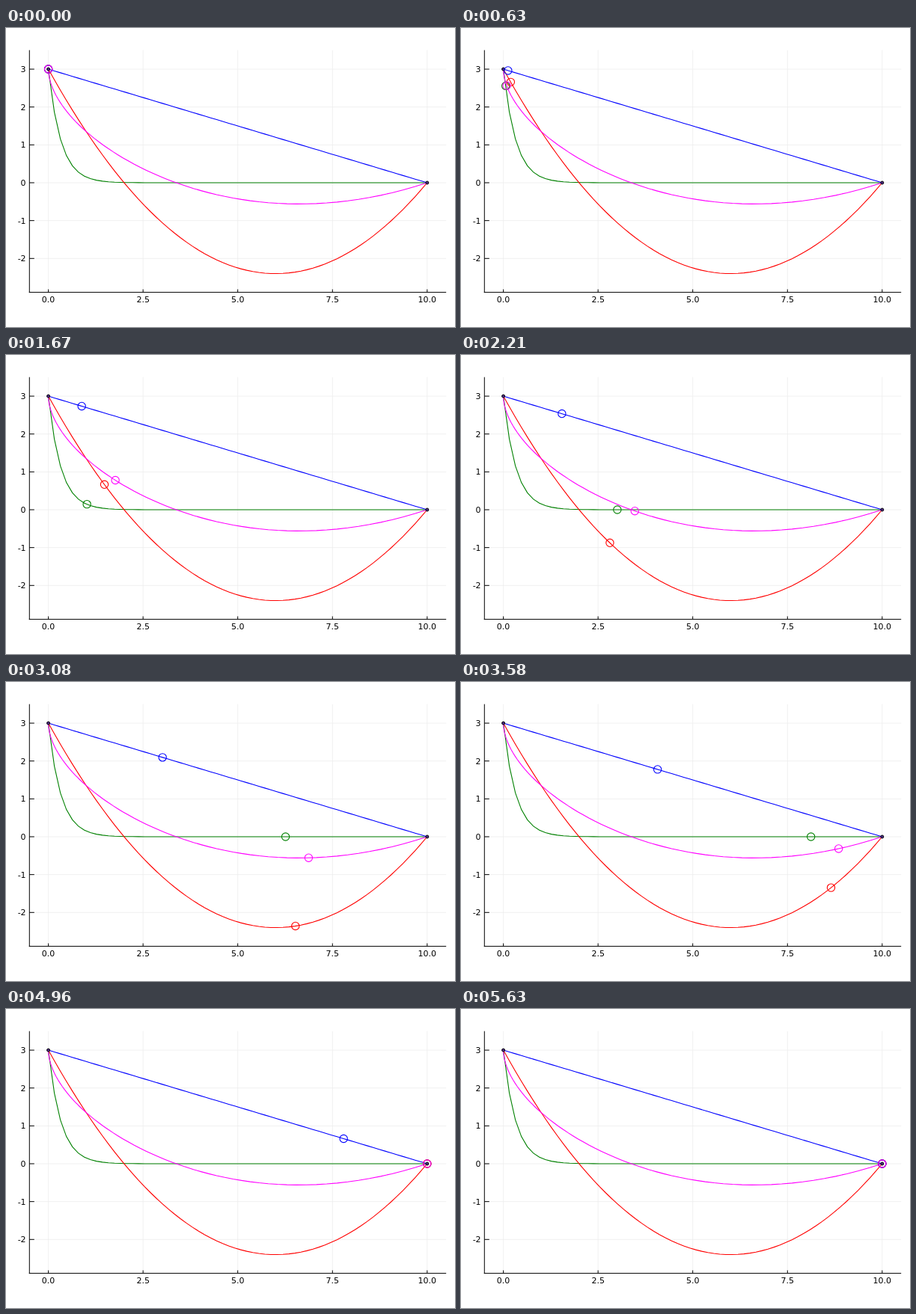
These frames come from a looping animation (600 px wide and 400 px high, 5680 ms). An HTML page:

```html
<!DOCTYPE html>
<html lang="en">
<head>
<meta charset="utf-8">
<title>Descent curves</title>
<style>
  html, body { margin: 0; width: 100%; height: 100%; overflow: hidden; background: #fff; }
  svg { display: block; }
  text { font: 11px "DejaVu Sans", sans-serif; fill: #000; }
</style>
</head>
<body>
<svg id="stage" width="600" height="400" viewBox="0 0 600 400"></svg>
<script>
const LOOP = 5680, FPS = 24, LAST_STEP = 135, DT = 0.02, G = 10;
const X_END = 10, Y_START = 3, SEGMENTS = 63;
const LEFT = 31.3, RIGHT = 588.2, TOP = 29.6, BOTTOM = 353.6;

const px = x => 56.6 + 50.62 * x;
const py = y => 207 - 50.65 * y;
const stage = document.getElementById('stage');

function add(tag, attrs, text) {
  const node = document.createElementNS('http://www.w3.org/2000/svg', tag);
  for (const key in attrs) node.setAttribute(key, attrs[key]);
  if (text) node.textContent = text;
  stage.appendChild(node);
  return node;
}

const line = (x1, y1, x2, y2, stroke, width) =>
  add('line', { x1, y1, x2, y2, stroke, 'stroke-width': width });

const even = u => X_END * u;
const denseStart = u => X_END * u * u;

const curves = [
  { color: '#008000', spacing: even, height: x => 3 * Math.exp(-3 * x) },
  { color: '#ff0000', spacing: even, height: x => 0.15 * x * x - 1.8 * x + 3 },
  { color: '#0000ff', spacing: even, height: x => 3 - 0.3 * x },
  { color: '#ff00ff', spacing: denseStart,
    height: x => 3 - 1.666 * x ** 0.55 + 0.01637 * x ** 2.25 }
];

// Sample a curve and time a frictionless slide from rest along its chords.
function buildTrack({ spacing, height }) {
  const track = [];
  for (let i = 0; i <= SEGMENTS; i++) {
    const x = spacing(i / SEGMENTS), y = height(x);
    const v = Math.sqrt(Math.max(0, 2 * G * (Y_START - y)));
    const prev = track[i - 1];
    const t = prev
      ? prev.t + 2 * Math.hypot(x - prev.x, y - prev.y) / (prev.v + v)
      : 0;
    track.push({ x, y, v, t });
  }
  return track;
}

function positionAt(track, t) {
  const i = track.findIndex(p => p.t > t);
  if (i < 0) return track[SEGMENTS];
  const a = track[i - 1], b = track[i];
  const f = (t - a.t) / (b.t - a.t);
  const part = (2 * a.v * f + (b.v - a.v) * f * f) / (a.v + b.v);
  return { x: a.x + (b.x - a.x) * part, y: a.y + (b.y - a.y) * part };
}

function drawAxes() {
  const xTicks = [0, 2.5, 5, 7.5, 10], yTicks = [-2, -1, 0, 1, 2, 3];
  for (const x of xTicks) line(px(x), TOP, px(x), BOTTOM, '#ececec', 0.8);
  for (const y of yTicks) line(LEFT, py(y), RIGHT, py(y), '#ececec', 0.8);
  line(LEFT, TOP, LEFT, BOTTOM + 0.5, '#000', 1);
  line(LEFT - 0.5, BOTTOM, RIGHT, BOTTOM, '#000', 1);
  for (const x of xTicks) {
    line(px(x), BOTTOM, px(x), BOTTOM - 4, '#000', 1);
    add('text', { x: px(x), y: 367, 'text-anchor': 'middle' }, x.toFixed(1));
  }
  for (const y of yTicks) {
    line(LEFT, py(y), LEFT + 6.5, py(y), '#000', 1);
    add('text', { x: 26.6, y: py(y) + 4, 'text-anchor': 'end' }, String(y));
  }
}

drawAxes();

for (const curve of curves) {
  curve.track = buildTrack(curve);
  add('polyline', {
    points: curve.track.map(p => `${px(p.x).toFixed(2)},${py(p.y).toFixed(2)}`).join(' '),
    fill: 'none', stroke: curve.color, 'stroke-width': 1.1
  });
}

for (const [x, y] of [[0, Y_START], [X_END, 0]])
  add('circle', { cx: px(x), cy: py(y), r: 2, fill: '#4b2a86', stroke: '#000', 'stroke-width': 1 });

for (const curve of curves)
  curve.bead = add('circle', { r: 5.15, fill: 'none', stroke: curve.color, 'stroke-width': 1.1 });

function render(ms) {
  // Steps run at 24 per second, with switch times rounded to 10 ms.
  const tick = Math.floor((ms % LOOP) / 10) * 10;
  const step = Math.min(LAST_STEP, Math.max(0, Math.floor((tick + 5) * FPS / 1000 - 1e-6)));
  for (const { track, bead } of curves) {
    const p = positionAt(track, step * DT);
    bead.setAttribute('cx', px(p.x));
    bead.setAttribute('cy', py(p.y));
  }
}

const start = performance.now();
function loop() {
  render(performance.now() - start);
  requestAnimationFrame(loop);
}
loop();
</script>
</body>
</html>
```
